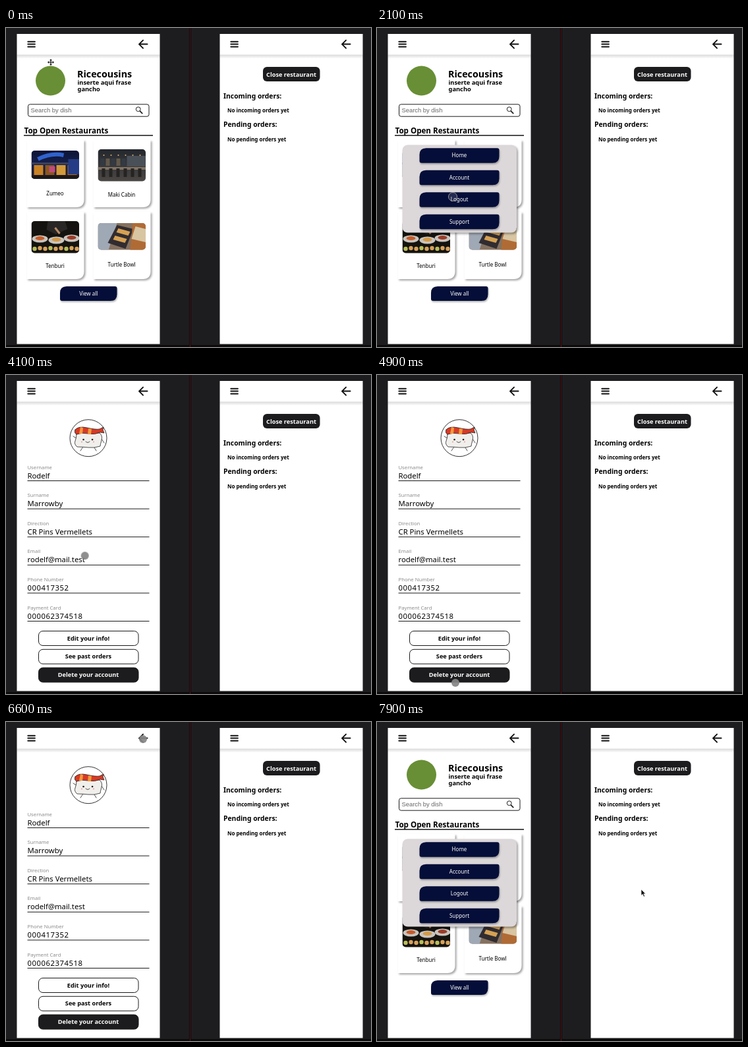
An HTML page that plays this animation: 554 px wide and 484 px high, repeating every 8 s.

```html
<!DOCTYPE html>
<html lang="en">
<head>
<meta charset="utf-8">
<title>Food ordering demo</title>
<style>
  html, body { margin: 0; width: 100%; height: 100%; overflow: hidden; background: #1d1d1f; }
  svg { display: block; width: 554px; height: 484px; }
  text { font-family: "Noto Sans", "Open Sans", sans-serif; font-size: 8px; fill: #000; }
  .bold { font-weight: 700; }
  .mid { text-anchor: middle; }
  .light { fill: #fff; }
  .label { font-size: 7.7px; fill: #8b8b8b; }
  .value { font-size: 11.3px; }
  .digits { letter-spacing: .54px; }
  .search { font: 9.4px "Liberation Sans", Arial, sans-serif; fill: #666; }
  .line { fill: none; stroke: #1b1b1b; stroke-width: 1; }
  .icon { fill: none; stroke: #111; stroke-width: 2; stroke-linecap: round; stroke-linejoin: round; }
  .drop { filter: drop-shadow(2.5px 2.5px 1.6px rgba(0, 0, 0, .36)); }
  .soft { filter: drop-shadow(1.5px 2px 1.2px rgba(0, 0, 0, .28)); }

  #home, #account, #menu, #cursor, #cursor > * { animation: 8s step-end infinite; }
  #home { animation-name: home; }
  #account { animation-name: account; }
  #menu { animation-name: menu; }
  #cursor { animation-name: travel; }
  #cursor .move { animation-name: move; }
  #cursor .dot { animation-name: dot; }
  #cursor .ring { animation-name: ring; }
  #cursor .arrow { animation-name: arrow; }

  @keyframes home { 0%, 86.25% { visibility: visible } 33.75% { visibility: hidden } }
  @keyframes account { 0%, 86.25% { visibility: hidden } 33.75% { visibility: visible } }
  @keyframes menu { 0% { opacity: 0 } 7.5%, 100% { opacity: 1 } }
  @keyframes move { 0% { opacity: 1 } 1.25%, 100% { opacity: 0 } }
  @keyframes dot { 0%, 22.5%, 88.75%, 100% { opacity: 0 } 1.25%, 38.75% { opacity: 1 } }
  @keyframes ring { 0%, 33.75%, 100% { opacity: 0 } 22.5% { opacity: 1 } }
  @keyframes arrow { 0%, 38.75% { opacity: 0 } 33.75%, 88.75%, 100% { opacity: 1 } }
  @keyframes travel {
    0% { transform: translate(68px, 52px); animation-timing-function: steps(7) }
    8.75%, 10% { transform: translate(44px, 22px); animation-timing-function: steps(4) }
    15% { transform: translate(37px, 24px); animation-timing-function: steps(5) }
    21.25% { transform: translate(70px, 71px); animation-timing-function: steps(4) }
    26.25% { transform: translate(115px, 256px); animation-timing-function: steps(4) }
    31.25%, 37.5% { transform: translate(118px, 229px); animation-timing-function: steps(4) }
    42.5%, 50% { transform: translate(120px, 245px); animation-timing-function: steps(7) }
    58.75%, 60% { transform: translate(118px, 449px); animation-timing-function: steps(1) }
    61.25% { transform: translate(119px, 467px); animation-timing-function: steps(4) }
    66.25% { transform: translate(125px, 270px); animation-timing-function: steps(4) }
    71.25% { transform: translate(82px, 50px); animation-timing-function: steps(1) }
    72.5% { transform: translate(64px, 36px); animation-timing-function: steps(8) }
    82.5%, 85% { transform: translate(208px, 26px); animation-timing-function: steps(1) }
    86.25% { transform: translate(209px, 28px); animation-timing-function: steps(8) }
    96.25% { transform: translate(399px, 250px); animation-timing-function: steps(2) }
    98.75%, 100% { transform: translate(401px, 254px) }
  }
</style>
</head>
<body>
<svg viewBox="0 0 554 484">
  <defs>
    <linearGradient id="headerShade" x2="0" y2="1">
      <stop stop-color="#000" stop-opacity=".15"/>
      <stop offset="1" stop-color="#000" stop-opacity="0"/>
    </linearGradient>
    <linearGradient id="night" x2="0" y2="1">
      <stop stop-color="#0b1336"/><stop offset=".45" stop-color="#17204a"/><stop offset="1" stop-color="#2b1a18"/>
    </linearGradient>
    <linearGradient id="bar" x2="0" y2="1">
      <stop stop-color="#23272d"/><stop offset="1" stop-color="#4b4745"/>
    </linearGradient>
    <g id="phone">
      <rect x="16.5" y="9" width="217" height="470.5" fill="#fff"/>
      <rect x="16.5" y="40.5" width="217" height="6" fill="url(#headerShade)"/>
      <path class="icon" d="M33.3 20.7h10.6M33.3 24.6h10.6M33.3 28.5h10.6"/>
      <path class="icon" d="M214.5 24.6H202.2M208 18.6l-6 6 6 6"/>
    </g>
  </defs>

  <rect width="554" height="484" fill="#1d1d1f"/>
  <path d="M279.5 0V484M0 482.5H554" stroke="#0c0a0b" stroke-width="3"/>
  <path d="M279.5 0V484" stroke="#5a1218"/>
  <use href="#phone"/>
  <use href="#phone" x="308"/>

  <g id="orders">
    <rect x="390" y="59" width="86.5" height="22" rx="6" fill="#1c1c1e"/>
    <text class="bold mid light" x="433" y="73.5" font-size="9.2" style="font-size:9.2px">Close restaurant</text>
    <text class="bold" x="330" y="106.5" style="font-size:10.35px">Incoming orders:</text>
    <text class="bold" x="336" y="128">No incoming orders yet</text>
    <text class="bold" x="330" y="150" style="font-size:10.35px">Pending orders:</text>
    <text class="bold" x="336" y="171.5">No pending orders yet</text>
  </g>

  <g id="home">
    <circle cx="67.5" cy="80" r="22.5" fill="#688f35"/>
    <text class="bold" x="108" y="75" style="font-size:14.3px">Ricecousins</text>
    <text class="bold" x="108.5" y="86" style="font-size:9.3px">inserte aqui frase</text>
    <text class="bold" x="108.5" y="96" style="font-size:9.3px">gancho</text>
    <rect class="line" x="33.5" y="115.8" width="183.5" height="18.4" rx="3"/>
    <text class="search" x="37.5" y="128.3">Search by dish</text>
    <g class="line"><circle cx="200.7" cy="123.2" r="3.4"/><path d="M203.2 125.8l4 4.2" stroke-width="1.8"/></g>
    <text class="bold" x="27.5" y="160.3" style="font-size:11.6px">Top Open Restaurants</text>
    <path d="M27 163H223" stroke="#111" stroke-width="1.4"/>
    <g id="cards"></g>
    <g id="viewAll"></g>
    <g id="menu">
      <rect class="drop" x="38.5" y="177.5" width="173.5" height="133" rx="8" fill="#dcd7d9"/>
    </g>
  </g>

  <g id="account">
    <circle class="line" cx="125" cy="95.7" r="28" style="stroke-width:.9"/>
    <g stroke="#222" stroke-width=".8" stroke-linecap="round" stroke-linejoin="round">
      <path d="M107 96l-5-3M145 97l4 6M117 109l-4 6M134 110l3 5" fill="none"/>
      <path d="M107 90q9-5 18-3t17 1q5 4 3 11t-2 9q-9 3-18 2t-17-1q-5-4-3-9t2-10z" fill="#f1efec"/>
      <path d="M105 83q5-6 18-3t19 2l6-3-1 4 2 5-6-1q-8 4-18 2t-18 1q-4-2-2-7z" fill="#d93a25"/>
      <path d="M113 79l4 1-1 9-5 0zM125 81l5 1-1 8-5 0z" fill="#f29a3d" stroke="none"/>
      <path d="M121 101q3 3 6 0" fill="none"/>
    </g>
    <path d="M117.5 98h.1M131 98h.1" stroke="#222" stroke-width="2.6" stroke-linecap="round"/>
    <path d="M114 101.5h2M132 101.5h2" stroke="#ee9a9a" stroke-width="1.6"/>
  </g>

  <g id="cursor">
    <g class="move" stroke="#111" stroke-width="1.2" fill="#111">
      <path d="M-3.6 0H3.6M0-3.6V3.6"/>
      <path stroke="none" d="M0-5l2 2.2h-4zM0 5l2-2.2h-4zM-5 0l2.2-2v4zM5 0l-2.2-2v4z"/>
    </g>
    <circle class="dot" r="6" fill="#858585" fill-opacity=".92"/>
    <circle class="ring" r="6.5" fill="#fff" fill-opacity=".12" stroke="#9a9798" stroke-width="1"/>
    <path class="arrow" d="M0 0V9.3l2.2-2 1.7 3.8 1.6-.7-1.7-3.7H6.6z" fill="#111" stroke="#fff" stroke-width=".6"/>
  </g>
</svg>
<script>
  const byId = id => document.getElementById(id);
  const add = (id, markup) => byId(id).insertAdjacentHTML('beforeend', markup);
  const rect = (x, y, w, h, fill, extra = '') =>
    `<rect x="${x}" y="${y}" width="${w}" height="${h}" fill="${fill}" ${extra}/>`;

  // Navy button: large top-left and bottom-right corners, small others.
  const pill = (x, y, w, h, label) => `
    <path class="soft" fill="#050e38" d="M${x + 10} ${y}h${w - 13}q3 0 3 3v${h - 13}q0 10-10 10h${13 - w}q-3 0-3-3v${13 - h}q0-10 10-10z"/>
    <text class="mid light" x="${x + w / 2}" y="${y + 14}">${label}</text>`;

  // Scenes use local coordinates inside a 73-wide frame.
  const plate = (x, y, food) =>
    `<ellipse cx="${x}" cy="${y}" rx="12" ry="5.5" fill="#c9c4bd"/><ellipse cx="${x}" cy="${y - 1}" rx="7" ry="3" fill="${food}"/>`;
  const times = (n, draw) => Array.from({ length: n }, (_, i) => draw(i)).join('');

  const shopFront = rect(0, 0, 73, 44, 'url(#night)')
    + '<path d="M10 13Q30 3 49 7" stroke="#3b7bff" stroke-width="6" fill="none" opacity=".75"/>'
    + rect(0, 18, 73, 3, '#39415f')
    + times(4, i => rect(4 + i * 17, 22, 14, 15, ['#c98325', '#8a571f', '#d39a3b', '#a76a25'][i]))
    + rect(27, 24, 9, 9, '#c04b7a') + rect(56, 13, 17, 23, '#243b86') + rect(0, 38, 73, 6, '#1c1719');
  const dimBar = rect(0, 0, 73, 49, 'url(#bar)')
    + times(5, i => rect(4 + i * 8, 14, 6, 11, i % 2 ? '#62594c' : '#333a43'))
    + rect(44, 10, 29, 16, '#4a5057') + rect(0, 27, 73, 4, '#817365')
    + times(6, i => rect(6 + i * 11, 29, 5, 13, '#252423'))
    + times(6, i => `<circle cx="${9 + i * 11}" cy="9" r="1" fill="#e0b878"/>`);
  const dinner = rect(0, 0, 73, 49, '#15130f')
    + '<path d="M25 0h26l4 12-18 8-14-7z" fill="#292725"/><path d="M36 10l7 9" stroke="#b98a65" stroke-width="3"/>'
    + plate(13, 27, '#c55c2c') + plate(38, 29, '#d49a46') + plate(61, 26, '#9b3c28')
    + times(9, i => `<circle cx="${5 + i * 8}" cy="${42 - i % 2}" r="3.2" fill="${i % 3 ? '#d6a15c' : '#b8bd59'}"/>`);
  const boxes = rect(0, 0, 73, 41, '#85715f')
    + '<path d="M0 0h29L16 41H0z" fill="#9fa8b5"/><path d="M29 3l25 6-12 30-27-9z" fill="#302c30"/>'
    + '<path d="M31 8l18 5-3 6-18-5zM26 19l18 5-3 6-18-5z" fill="#d5a153"/>'
    + '<path d="M53 0h20v41H49z" fill="#b06b35"/><path d="M57 5l16 4v20l-22-5z" fill="#d8c5a2"/>';

  const card = ([x, y, photoY, h, scene, name, baseline], i) => `
    <path class="drop" fill="#fff" d="M${x - 7} ${y}h${87}v90q0 12-12 12h-75z"/>
    <clipPath id="frame${i}"><rect width="72.5" height="${h}" rx="5"/></clipPath>
    <g transform="translate(${x} ${photoY})"><g clip-path="url(#frame${i})">${scene}</g></g>
    <text class="mid" x="${x + 36}" y="${baseline}">${name}</text>`;

  add('cards', [
    [38.5, 170, 186, 43, shopFront, 'Zumeo', 253.5],
    [139.5, 170, 184, 48.5, dimBar, 'Maki Cabin', 255.5],
    [38.5, 279, 293, 48.5, dinner, 'Tenburi', 364],
    [139.5, 279, 296, 40.5, boxes, 'Turtle Bowl', 361.5]
  ].map(card).join(''));

  add('viewAll', pill(82, 392, 86.5, 22, 'View all'));
  add('menu', ['Home', 'Account', 'Logout', 'Support']
    .map((label, i) => pill(64.5, 182.3 + i * 33.5, 121, 22.5, label)).join(''));

  add('account', [
    ['Username', 'Rodelf'],
    ['Surname', 'Marrowby'],
    ['Direction', 'CR Pins Vermellets'],
    ['Email', 'rodelf@mail.test'],
    ['Phone Number', '000417352'],
    ['Payment Card', '000062374518']
  ].map(([label, value], i) => {
    const y = 160.5 + i * 42.6;
    return `<text class="label" x="32.5" y="${y - 18}">${label}</text>
      <text class="value ${i > 3 ? 'digits' : ''}" x="32.5" y="${y - 4}">${value}</text>
      <path class="line" d="M32.5 ${y}H217.5"/>`;
  }).join(''));

  add('account', ['Edit your info!', 'See past orders', 'Delete your account'].map((label, i) => {
    const y = 388.5 + i * 27.8, dark = i === 2;
    return rect(49.5, y, 151.5, 22, dark ? '#1c1c1e' : '#fff', 'rx="6.5" stroke="#1b1b1b"')
      + `<text class="bold mid ${dark ? 'light' : ''}" x="125" y="${y + 14}" style="font-size:9.2px">${label}</text>`;
  }).join(''));
</script>
</body>
</html>
```
